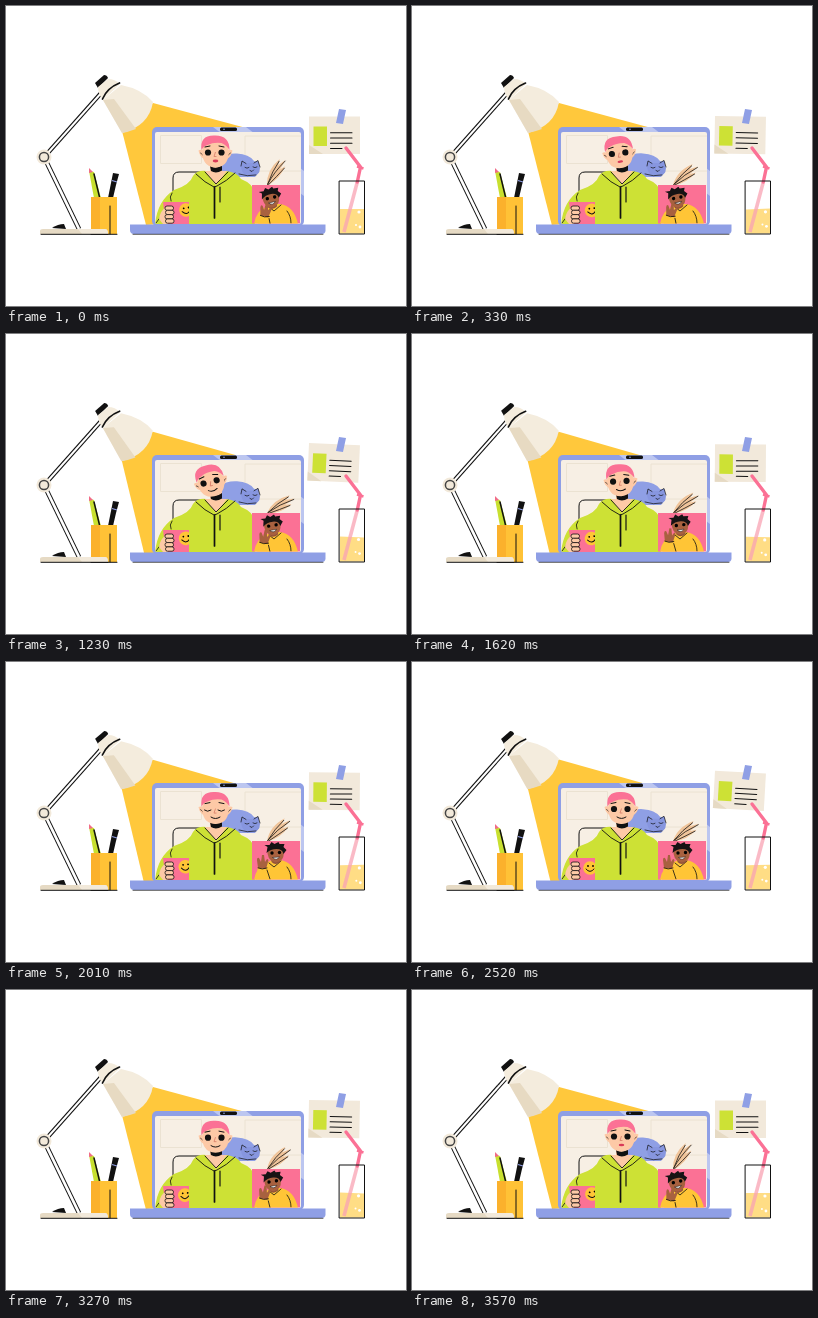
Animation of 400 by 300 pixels, one loop 3600 ms. Source, as an HTML page:

```html
<!DOCTYPE html>
<html lang="en">
<head>
<meta charset="utf-8">
<title>Video call desk</title>
<style>
html, body { margin: 0; width: 100%; height: 100%; overflow: hidden; background: #fff; }
svg { display: block; width: 100vw; height: 100vh; }
.ink { fill: none; stroke: #111; stroke-linecap: round; stroke-linejoin: round; }
</style>
</head>
<body>
<svg viewBox="0 0 400 300">
  <defs>
    <clipPath id="screen"><rect x="149" y="126" width="146" height="92" rx="2"/></clipPath>
    <clipPath id="lid"><rect x="146" y="121" width="152" height="98" rx="5"/></clipPath>
    <clipPath id="tile"><rect x="246" y="179" width="48" height="38.500"/></clipPath>
    <clipPath id="mugClip"><path d="M157 195H183V218H157Z"/></clipPath>
  </defs>

  <!-- pencil cup -->
  <path d="M83 165L88 166L95 192H88Z" fill="#c8e02f"/>
  <path d="M83 167L83 162L87 166Z" fill="#f16c87"/>
  <path class="ink" d="M88 168L93.500 191" stroke-width="1.500"/>
  <path d="M107 167L113 168L110 179L107 192H102Z" fill="#111"/>
  <path d="M106 174.500L111 176" stroke="#8f9de4" stroke-width="1.200"/>
  <path d="M85 191H111V228H85Z" fill="#ffc236"/>
  <path d="M85 191H94V228H85Z" fill="#fbb12c"/>
  <path class="ink" d="M104 200V228M85 228.300H111" stroke-width="1"/>

  <!-- lamp -->
  <g fill="none">
    <path d="M96 86L40 149" stroke="#111" stroke-width="4.200"/>
    <path d="M97 85L40 149" stroke="#fff" stroke-width="2"/>
    <path d="M39.500 154L73 223" stroke="#111" stroke-width="4.600"/>
    <path d="M39.500 154L73 223" stroke="#fff" stroke-width="2.800"/>
  </g>
  <path d="M46 222Q52 218 58 218L60 223Z" fill="#111"/>
  <path d="M34 228V225Q34 223 37 223H99Q102 223 102 228Z" fill="#e6dac4"/>
  <path d="M72 223H99Q102 223 102 228H76Z" fill="#f2e9da"/>
  <path class="ink" d="M35 228.300H102" stroke-width="1"/>
  <circle cx="38" cy="151" r="7.500" fill="#f2e9da"/>
  <circle cx="38" cy="151" r="4.600" fill="none" stroke="#444" stroke-width="1.500"/>
  <g id="lamp">
    <path d="M116 125L140 219L270 210V130L147 97Z" fill="#ffc83c"/>
    <path d="M89 77L98 69Q101 69 102 72L92 82Z" fill="#111"/>
    <path d="M92 81L102 73Q109 73 114 78L97 94Q92 88 92 81Z" fill="#f4ecdd"/>
    <path d="M97 94L115 79Q136 83 147 96Q143 120 116 127Z" fill="#f4ecdd"/>
    <path d="M97 94L108 93L130 123Q122 126 116 127Z" fill="#e7dac2"/>
    <path class="ink" d="M96.500 93Q101 82 113.500 77" stroke-width="1.700"/>
  </g>

  <!-- laptop -->
  <rect x="146" y="121" width="152" height="99" rx="5" fill="#8f9fe5"/>
  <path d="M207 121H240L298 165V190Z" fill="#fff" opacity=".4" clip-path="url(#lid)"/>
  <rect x="149" y="126" width="146" height="92" rx="2" fill="#f7efe4"/>
  <path d="M154.500 129.500H195.500V157.500H154.500ZM239 130H296V165H239Z" fill="none" stroke="#ebe2d2" clip-path="url(#screen)"/>
  <rect x="214" y="121.500" width="17" height="3.500" rx="1.500" fill="#111"/>
  <circle cx="218" cy="123.200" r=".8" fill="#8f9fe5"/>

  <g clip-path="url(#screen)">
    <path class="ink" d="M167 188V172Q167 166 173 166H198" stroke-width="1"/>
    <!-- cat -->
    <g id="cat">
      <path d="M214 168V152Q220 147 231 147.500Q243 148 248 155L253 156V166L249 171H216Z" fill="#8f9fe5"/>
      <path d="M235 159L236 155L240 157H248L252 154.500L254 162Q254 170 245 170Q235 170 235 159Z" fill="#8796df"/>
      <path class="ink" d="M235 160L236 155L240 157.500M248 157L252 154.500L254 161M239 161.500Q241 163 243 161.500M247 161Q249 162.500 251 161M244 164.500L246 165.500L247.500 164M233 168Q241 171 250 169" stroke-width=".7"/>
    </g>
    <!-- dry leaves -->
    <g id="leaves">
      <path d="M261 179Q272 169 289 172Q281 177 262 180ZM261 179Q276 171 292 177Q279 180 262 180ZM261 179Q276 176 287 181Q274 185 262 180Z" fill="#f0c49a"/>
      <path class="ink" d="M262 179Q275 174 287 173M262 179Q276 176 291 177.500M262 180Q274 181 285 181.500" stroke-width=".7"/>
    </g>
    <!-- hoodie -->
    <path d="M149 219Q151 195 168 184Q184 179 187 170Q191 164 200 165H220Q231 166 235 173Q248 178 249 188V219Z" fill="#cde135"/>
    <path d="M199 165H221L210 179Z" fill="#fdc9a6"/>
    <path class="ink" d="M190 168Q199 177 208 181L211 180Q221 175 229 167M199 166L210 178L222 166" stroke-width=".9"/>
    <path class="ink" d="M208.500 181V212" stroke-width="1.700"/>
    <path class="ink" d="M214 181V196" stroke-width="1.200"/>
    <path class="ink" d="M165 195Q163 191 166 187M150 217Q153 212 157 209" stroke-width=".8"/>
    <!-- head -->
    <path d="M204 153H216V168Q210 171 204 167Z" fill="#fdc9a6"/>
    <path d="M204 160Q210 164 216 159V164.500Q210 168 205 165Z" fill="#111"/>
    <g id="head">
      <path d="M199 146Q195 144 193 145.500Q194 152 199 154ZM221 146Q225 144 227 145.500Q226 152 221 154Z" fill="#fdc9a6"/>
      <path class="ink" d="M195 148Q197 149 198 151M225 148Q223 149 222 151" stroke-width=".6"/>
      <path d="M197 142Q199 134 210 134Q221 134 223 142Q225 162 210 162.500Q195 162 197 142Z" fill="#fdc9a6"/>
      <path d="M196 145Q194 130 209 130.500Q224 130 224 145Q221 140 216 138Q208 137 202 140Q198 141 196 145Z" fill="#fb7195"/>
      <g id="eyes" fill="#111"><circle cx="202.500" cy="147.500" r="3.100"/><circle cx="216" cy="147.500" r="3.100"/></g>
      <path id="lids" class="ink" d="M199 148.500Q202 151 205.500 148.500M212.500 148.500Q216 151 219 148.500" stroke-width="1"/>
      <path class="ink" d="M199.500 142L204.500 141M213.500 141L218.500 142" stroke-width="1"/>
      <path d="M210 147L208.500 151.500H211" fill="none" stroke="#d77b68" stroke-width=".8"/>
      <path id="smile" class="ink" d="M205.500 155.500Q210 158.500 214.500 155.500" stroke-width="1"/>
      <ellipse id="mouth" cx="210" cy="156" rx="2.800" ry="1.400" fill="#d93958"/>
    </g>
    <!-- mug -->
    <g clip-path="url(#mugClip)">
      <path d="M157 196H183V219H160Z" fill="#fb7195"/>
      <g id="smiley">
        <circle cx="178" cy="206" r="6.800" fill="#ffc536"/>
        <circle cx="176" cy="204" r=".9"/><circle cx="181" cy="204" r=".9"/>
        <path class="ink" d="M174 207Q178 212 182 207" stroke-width="1"/>
      </g>
    </g>
    <path d="M153 213Q154 205 160 201L162 218H157Z" fill="#fdc9a6"/>
    <g id="fingers" fill="#fdc9a6" stroke="#111" stroke-width=".8"></g>

    <!-- second caller -->
    <rect x="246" y="179" width="48" height="38.500" fill="#fb7195"/>
    <g clip-path="url(#tile)">
      <path d="M248 218Q250 205 260 201L266 198H274Q288 200 292 218Z" fill="#ffc536"/>
      <path class="ink" d="M281 205Q285 210 285 217M263 201L268 205L275 199" stroke-width=".8"/>
      <g id="pal">
        <path d="M264 193H273V200Q268 204 264 200Z" fill="#93523a"/>
        <path d="M260 187Q268 181 276 187Q278 199 268 200.500Q259 199 260 187Z" fill="#a8613f"/>
        <path d="M259 191L260 185L257 183L262 183L264 180L267 182L271 180L272 182L277 182L276 185L279 188L276 192Q275 187 269 187Q263 187 259 191Z" fill="#171314"/>
        <circle cx="264.500" cy="191" r="1.700"/><circle cx="272" cy="190.500" r="1.700"/>
        <path d="M265 195.500Q269 199 272 195Z" fill="#fff" stroke="#111" stroke-width=".5"/>
      </g>
      <g id="arm">
        <path d="M250 218L252 204H261L264 218Z" fill="#ffc536"/>
        <path d="M252 206L251 198Q251 195 253 196L255 200L256 193L258 193L259 200L261 197Q263 197 262 200L260 207Z" fill="#a8613f"/>
        <path class="ink" d="M252 206Q256 208 261 206M264 217L261 208" stroke-width=".8"/>
      </g>
    </g>
  </g>
  <path d="M124 218.500H319.500V225Q319 228 316 228H128Q124 228 124 224Z" fill="#8f9fe5"/>
  <path class="ink" d="M127 228.300H317" stroke-width=".7"/>

  <!-- pinned note -->
  <g id="note">
    <rect x="303" y="110.500" width="51" height="37.500" fill="#f2e9db"/>
    <path d="M303 139L317 148H303Z" fill="#e6dac4"/>
    <rect x="307.500" y="120.500" width="13.500" height="19.500" fill="#cde135"/>
    <path class="ink" d="M324.500 126.800H346M324.500 132H346M324.500 137.200H346M324.500 142.400H336" stroke-width="1"/>
  </g>
  <path d="M333 103L340 104L337 118L330 117Z" fill="#8f9fe5"/>

  <!-- drink -->
  <path id="liquid" fill="#ffdd85"/>
  <path d="M351.300 176L338 226" stroke="#f9a3b4" stroke-width="3.600" opacity=".75"/>
  <path d="M340 142L354.500 161L351.300 176" fill="none" stroke="#fb7195" stroke-width="3.400" stroke-linejoin="round" stroke-linecap="round"/>
  <path d="M351 160.500L357.500 162.500" stroke="#fb7195" stroke-width="2.500"/>
  <g id="bubbles" fill="#fff"></g>
  <path class="ink" d="M333.500 175H358.500V228H333.500Z" stroke-width="1"/>
</svg>
<script>
const LOOP = 3600;
const el = id => document.getElementById(id);
const set = (id, name, value) => el(id).setAttribute(name, value);

function addShape(parent, tag, attrs) {
  const node = document.createElementNS("http://www.w3.org/2000/svg", tag);
  for (const name in attrs) node.setAttribute(name, attrs[name]);
  el(parent).append(node);
  return node;
}

for (let i = 0; i < 4; i++) {
  addShape("fingers", "rect", { x: 159 + i % 2 * .5, y: 200 + i * 4.3, width: 8.5, height: 4.3, rx: 2 });
}
const bubbles = [[353, 206, 1.6], [350, 219, 1], [354, 221, 1.4]].map(([cx, cy, r]) =>
  addShape("bubbles", "circle", { cx, cy, r }));

// Smoothly interpolate a table of [time, value] steps.
function ease(t, steps) {
  for (let i = 1; i < steps.length; i++) {
    const [a, from] = steps[i - 1], [b, to] = steps[i];
    if (t <= b) {
      const p = (t - a) / (b - a);
      return from + (to - from) * p * p * (3 - 2 * p);
    }
  }
  return steps[steps.length - 1][1];
}

// One smooth swing from 0 to 1 and back per period.
const swing = (t, period) => (1 - Math.cos(t / period * Math.PI * 2)) / 2;

const tilt = [[0, 0], [150, 0], [550, -15], [1300, -14], [1750, 0], [LOOP, 0]];
const dip = [[0, -1], [600, 0], [2500, -.5], [3000, 1], [LOOP, -1]];
const leafTurn = [[0, -50], [630, -18], [1230, -24], [2010, -38], [2520, -30], [3000, -26], [LOOP, -50]];
const mug = [[0, 2], [630, 1.2], [1230, 1.6], [2010, 1.3], [2520, 0], [3000, 0], [LOOP, 2]];
const wave = [[0, 1], [630, .9], [1230, .7], [2010, 0], [2520, 0], [3000, .35], [LOOP, 1]];
const blink = [[0, 1], [1830, 1], [1930, 0], [2060, 0], [2170, 1], [LOOP, 1]];

function draw(now) {
  const t = now % LOOP;
  const sway = swing(t, 1800);

  set("note", "transform", `rotate(${3.6 * sway} 335 110)`);
  set("lamp", "transform", `rotate(${swing(t, LOOP)} 97 85)`);

  const turn = ease(t, tilt);
  set("head", "transform", `translate(${turn * .1 - .5} ${ease(t, dip)}) rotate(${turn} 210 161)`);
  const open = ease(t, blink);
  set("eyes", "transform", `translate(0 ${147.5 * (1 - open)}) scale(1 ${open})`);
  set("eyes", "opacity", open > .2 ? 1 : 0);
  set("lids", "opacity", open > .2 ? 0 : 1);
  const talking = t < 900 || t > 3300;
  set("mouth", "opacity", talking ? 1 : 0);
  set("smile", "opacity", talking ? 0 : 1);
  set("mouth", "ry", 1.4 + .5 * Math.sin(t / 300 * Math.PI));

  set("cat", "transform", `translate(0 ${168 * -.02 * sway}) scale(1 ${1 + .02 * sway})`);
  set("leaves", "transform", `rotate(${ease(t, leafTurn)} 261 179)`);
  const shift = ease(t, mug);
  set("smiley", "transform", `translate(${shift} ${-shift}) rotate(${-shift * 5} 178 206)`);

  const lift = ease(t, wave);
  set("pal", "transform", `translate(${1.5 - lift * 3} ${lift}) rotate(${-lift * 9} 268 202)`);
  set("arm", "transform", `translate(${lift} ${lift * 4}) rotate(${lift * 7} 257 217)`);

  const tip = Math.sin(t / 1800 * Math.PI * 2) * .5;
  set("liquid", "d", `M334 ${203 + tip}Q346 203 358 ${203 - tip}V227.5H334Z`);
  bubbles.forEach((b, i) => b.setAttribute("transform", `translate(${tip} ${-sway * (i + 1) * .7})`));
}

function frame(now) {
  draw(now);
  requestAnimationFrame(frame);
}
draw(0);
requestAnimationFrame(frame);
</script>
</body>
</html>
```
